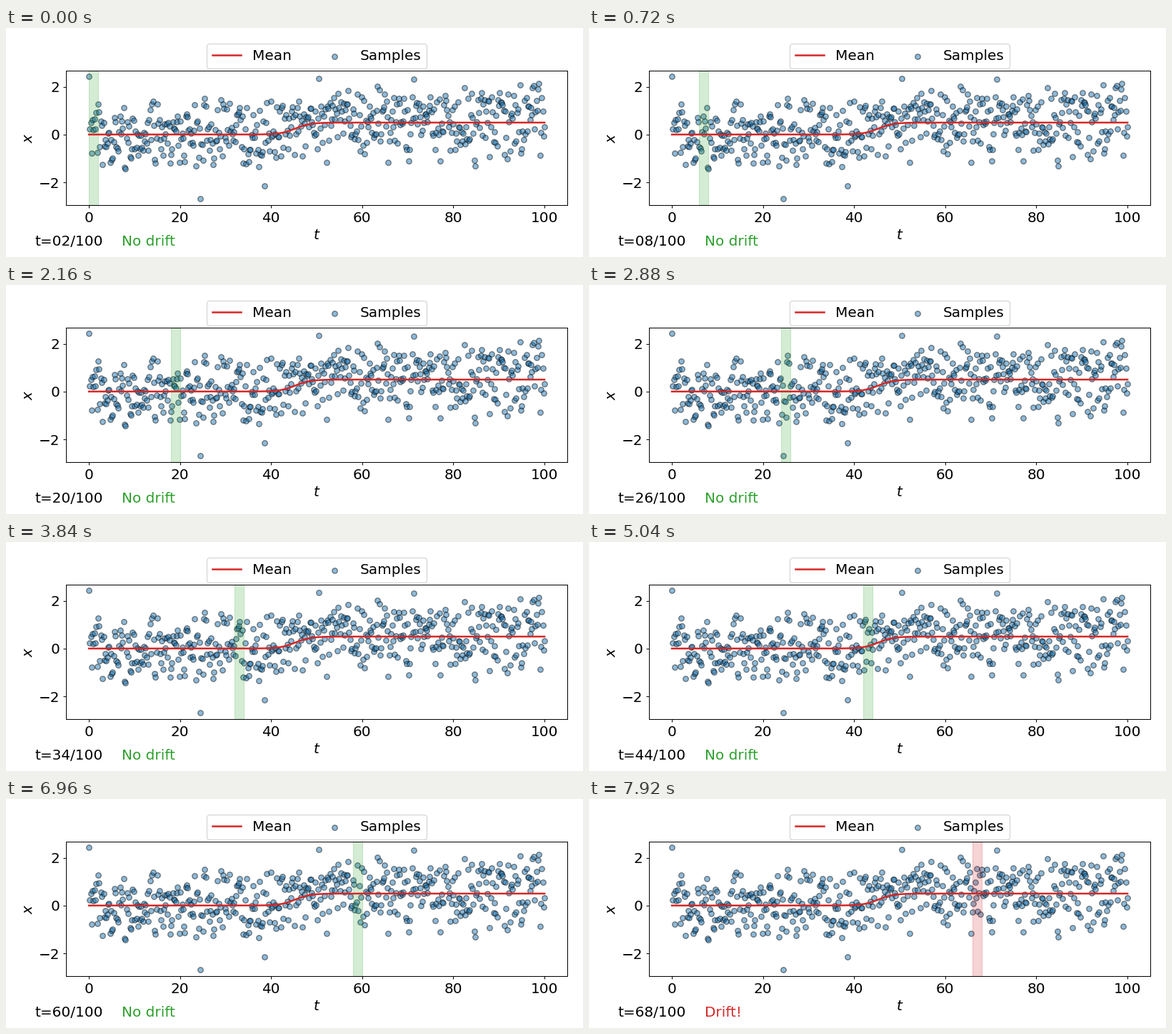
Animation of 808 by 322 pixels, one loop 8000 ms. Source, as a matplotlib script:

```python
import matplotlib.pyplot as plt
import numpy as np
from matplotlib.animation import FuncAnimation

W, H, DPI = 808, 322, 90
LEFT, RIGHT, TOP, BOTTOM = 84.2, 786, 60.2, 248.8   # plot box, pixels from top left
STEP, HOLD, TICK = 2, 3, 80      # window width, frames per window, ms per frame
FRAMES = 100
DRIFT_AT = 62
BLUE, GREEN, RED = "tab:blue", "tab:green", "tab:red"

plt.rcParams.update({"font.family": "DejaVu Sans", "font.size": 16})


def mean(t):
    return 0.5 / (1 + np.exp(-(t - 45.3) / 1.65))


def make_samples(n=500):
    """Noise around the mean, softly bounded, with a few far outliers."""
    t = np.linspace(0, 100, n)
    noise = np.random.default_rng(31).normal(0, 0.85, n)
    x = mean(t) + 2 * np.tanh(noise / 2)
    for at, value in [(0, 2.43), (24.4, -2.69), (38.4, -2.16), (50.6, 2.33)]:
        x[round(at / 100 * (n - 1))] = value
    return t, x


fig = plt.figure(figsize=(W / DPI, H / DPI), dpi=DPI, facecolor="white")
ax = fig.add_axes([LEFT / W, 1 - BOTTOM / H,
                   (RIGHT - LEFT) / W, (BOTTOM - TOP) / H])
t, x = make_samples()
ax.plot(t, mean(t), color=RED, lw=2, label="Mean")
ax.scatter(t, x, s=36, color=BLUE, edgecolors="black", linewidths=1,
           alpha=0.5, label="Samples")
span = ax.axvspan(0, STEP, alpha=0.2)

ax.set(xlim=(-5, 105), ylim=(-2.946, 2.666), yticks=[-2, 0, 2])
ax.set_xlabel("$t$")
ax.set_ylabel("$x$")
ax.legend(loc="lower center", bbox_to_anchor=(0.5, 1), ncol=2,
          borderaxespad=0.17)

clock = fig.text(40.5 / W, 16 / H, "")
status = fig.text(162 / W, 16 / H, "")


def update(frame):
    end = STEP * (frame // HOLD + 1)
    drift = end >= DRIFT_AT
    color = RED if drift else GREEN
    span.set_x(end - STEP)
    span.set_color(color)
    clock.set_text(f"t={end:02d}/100")
    status.set_text("Drift!" if drift else "No drift")
    status.set_color(color)
    return span, clock, status


anim = FuncAnimation(fig, update, frames=FRAMES, interval=TICK,
                     init_func=lambda: update(0), repeat=True, repeat_delay=0)
plt.show()
```
